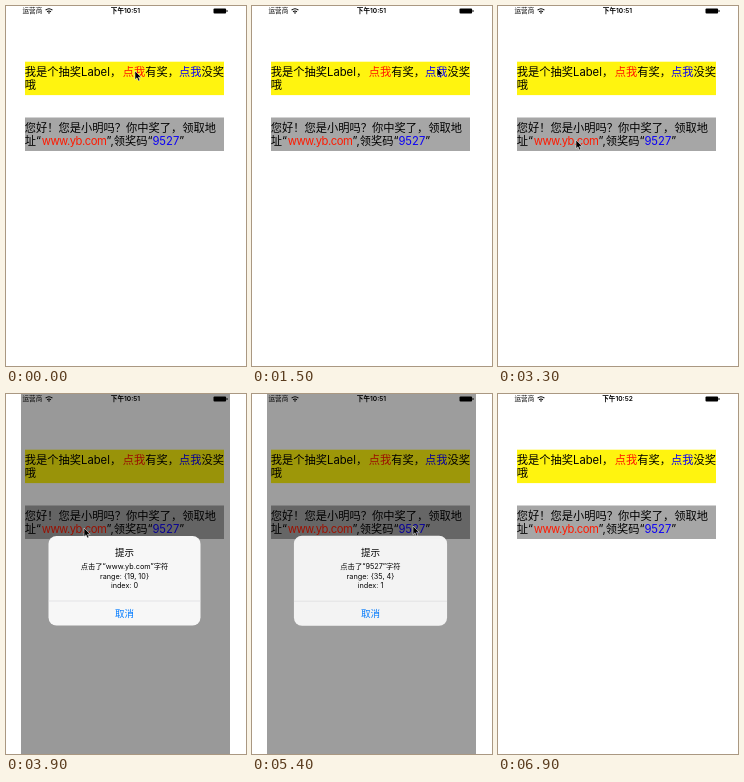
Animation of 240 by 360 pixels, one loop 7.2 s. Source, as an HTML page:

```html
<!DOCTYPE html>
<html lang="zh-CN">
<head>
<meta charset="utf-8">
<style>
  html, body { margin: 0; width: 100%; height: 100%; overflow: hidden; background: #fff; }
  svg { display: block; width: 100vw; height: 100vh; }
  text { font-family: Inter, 'Noto Sans CJK SC', 'Noto Sans CJK', sans-serif; white-space: pre; }
  .label { font-size: 11.25px; }
  .status { font-size: 6.6px; }
  .heading { font-size: 9.5px; font-weight: 500; }
  .message { font-size: 7.25px; }
  .middle { text-anchor: middle; }
  .red { fill: #ff1a00; }
  .blue { fill: #0c00f5; }
  .link { letter-spacing: -.5px; }
</style>
</head>
<body>
<svg viewBox="0 0 240 360">
  <g class="status">
    <text x="16.5" y="7.4">运营商</text>
    <path d="M39.6 4.2Q43 1.2 46.4 4.2M41.1 5.8Q43 4.1 44.9 5.8" fill="none" stroke="#000" stroke-width="1.1"/>
    <path d="M42 6.7Q43 5.9 44 6.7L43 7.9Z"/>
    <text id="clock" class="middle" x="119.5" y="7.4" font-weight="600"></text>
    <rect x="207.5" y="2.6" width="12.6" height="4.8" rx="1"/>
    <rect x="220.5" y="4.1" width="1" height="1.8" rx=".5"/>
  </g>

  <rect x="19" y="55.7" width="199" height="33.4" fill="#fff40f"/>
  <g class="label">
    <text x="18.8" y="70">我是个抽奖Label，</text>
    <text x="116.8" y="70"><tspan class="red">点我</tspan>有奖，<tspan class="blue">点我</tspan>没奖</text>
    <text x="18.8" y="83.3">哦</text>
  </g>

  <rect x="19" y="111.5" width="199" height="33.5" fill="#a6a6a6"/>
  <g class="label">
    <text x="18.8" y="126.2">您好！您是小明吗？你中奖了，领取地</text>
    <text x="18.8" y="139.4">址“</text>
    <text x="35.7" y="139.4" class="red link">www.yb.com</text>
    <text x="100.6" y="139.4">”,领奖码“<tspan class="blue">9527</tspan>”</text>
  </g>

  <rect id="dim" x="15" width="209" height="360"/>
  <g id="alert" class="middle">
    <rect x="42.5" y="142" width="152" height="89.5" rx="8" fill="#f7f7f7"/>
    <text class="heading" x="118.5" y="162.2">提示</text>
    <g class="message">
      <text id="hit" x="118.5" y="175.2"></text>
      <text id="range" x="118.5" y="184.8"></text>
      <text id="index" x="118.5" y="193.9"></text>
    </g>
    <path d="M42.5 207H194.5" stroke="#d6d6d8" stroke-width=".6"/>
    <text class="heading" x="118.5" y="223" fill="#007aff">取消</text>
  </g>
  <path id="cursor" d="M0 0V8.6L2 6.8L3.4 10L4.9 9.3L3.5 6.2H6.2Z" stroke="#fff" stroke-width=".5"/>
</svg>
<script>
const LOOP = 7200, STEP = 300, LEAVE = 6600;
const cancel = { x: 132, y: 218 };
// Each tap opens an alert, which closes when the cursor has reached the cancel button
const taps = [
  { word: '点我', start: 12, index: 0, x: 129, y: 65, open: 100, close: 950 },
  { word: '点我', start: 17, index: 1, x: 185, y: 62, open: 1940, close: 2750 },
  { word: 'www.yb.com', start: 19, index: 0, x: 78, y: 134, open: 3520, close: 4305 },
  { word: '9527', start: 35, index: 1, x: 161, y: 132, open: 5200, close: 6105 },
];

const $ = id => document.getElementById(id);
const progress = (t, from, duration) => Math.min(1, Math.max(0, (t - from) / duration));
const easeOut = u => 1 - (1 - u) ** 3;
const smooth = u => u * u * (3 - 2 * u);
const mix = (a, b, u) => a + (b - a) * u;
const between = (a, b, u) => ({ x: mix(a.x, b.x, u), y: mix(a.y, b.y, u) });

function cursorAt(t, tap, next) {
  return t < tap.close
    ? between(tap, cancel, smooth(progress(t, tap.close - 400, 300)))
    : between(cancel, next, smooth(progress(t, tap.close, 540)));
}

function draw(t) {
  const current = Math.max(0, taps.findLastIndex(tap => t >= tap.open));
  const tap = taps[current];
  const { x, y } = cursorAt(t, tap, taps[current + 1] || cancel);
  const opened = easeOut(progress(t, tap.open, 300));
  const shown = opened * (1 - progress(t, tap.close, 250));
  const scale = mix(1.2, 1, opened);

  $('clock').textContent = t < LEAVE ? '下午10:51' : '下午10:52';
  $('dim').setAttribute('opacity', .4 * shown);
  $('alert').setAttribute('opacity', shown);
  $('alert').setAttribute('transform', `translate(118.5 186.5) scale(${scale}) translate(-118.5 -186.5)`);
  $('hit').textContent = `点击了“${tap.word}”字符`;
  $('range').textContent = `range: {${tap.start}, ${tap.word.length}}`;
  $('index').textContent = `index: ${tap.index}`;
  $('cursor').setAttribute('transform', `translate(${x} ${y})`);
  $('cursor').setAttribute('opacity', t < LEAVE ? 1 : 0);
}

function tick() {
  const t = performance.now() % LOOP;
  draw(t - t % STEP);
  requestAnimationFrame(tick);
}
tick();
</script>
</body>
</html>
```
